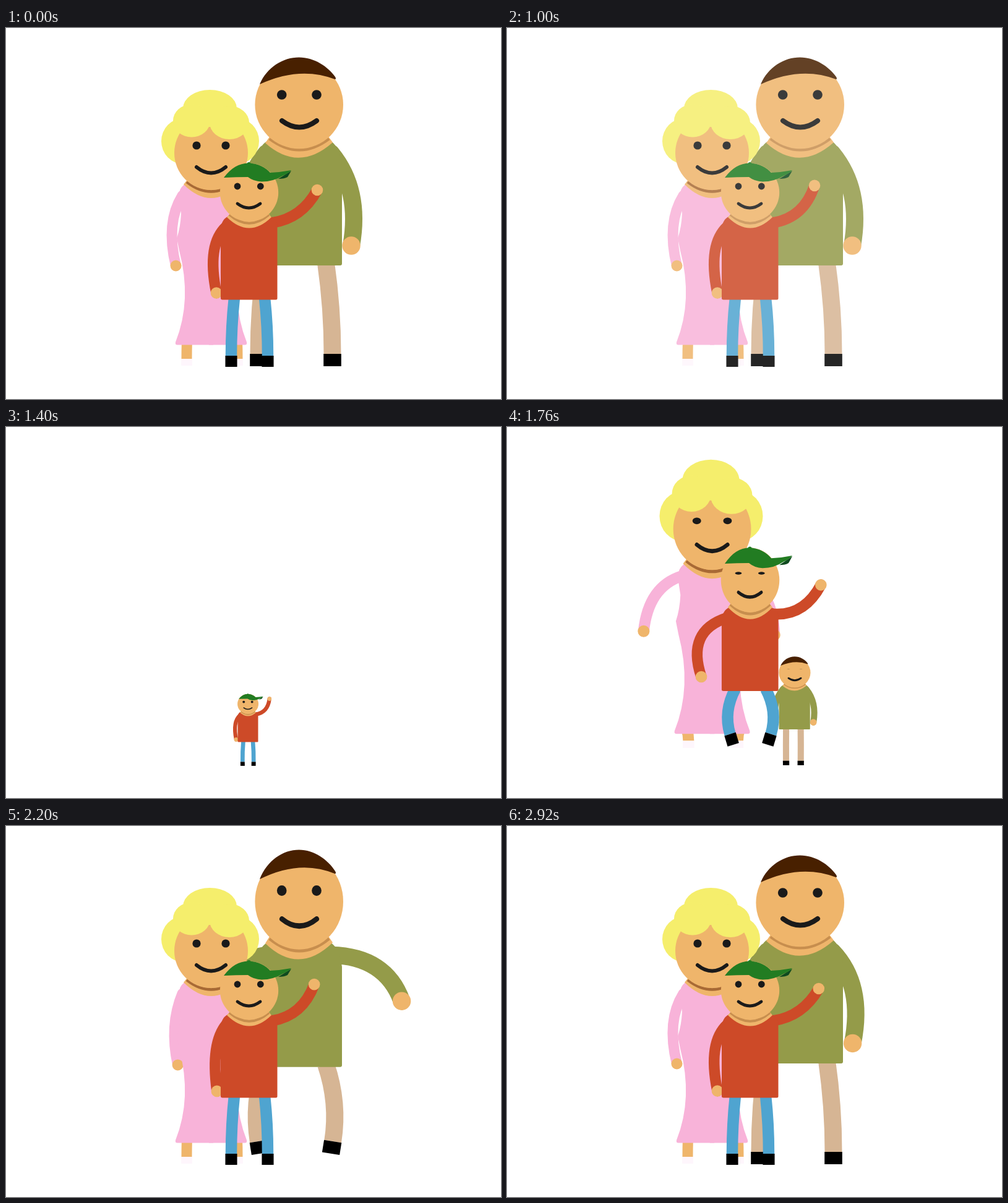
Recreate the animation shown at these times as an HTML page with a canvas. Size 800x600 px, loop 2960 ms.

```html
<!DOCTYPE html>
<html lang="en">
<head>
<meta charset="utf-8">
<title>Family</title>
<style>
  html, body { margin: 0; width: 100%; height: 100%; overflow: hidden; background: #fff; }
  canvas { display: block; width: 800px; height: 600px; }
</style>
</head>
<body>
<canvas id="stage" width="800" height="600"></canvas>
<script>
const canvas = document.getElementById('stage');
const ctx = canvas.getContext('2d');
const LOOP = 2960, STEP = 40, FADE_START = 965, FADE_END = 1200;
const SKIN = '#efb56b', INK = '#1a1a1a', SHADE = '#c78e4e';

// ---- drawing helpers ----
function fill(d, color) {
  ctx.fillStyle = color;
  ctx.fill(new Path2D(d));
}

function line(d, color, width, cap = 'butt') {
  ctx.strokeStyle = color;
  ctx.lineWidth = width;
  ctx.lineCap = cap;
  ctx.stroke(new Path2D(d));
}

function oval(x, y, rx, ry, color) {
  ctx.fillStyle = color;
  ctx.beginPath();
  ctx.ellipse(x, y, rx, ry, 0, 0, 7);
  ctx.fill();
}

// Draws the right side, then its reflection about x = cx
function mirrored(cx, draw) {
  draw(1);
  ctx.save();
  ctx.translate(2 * cx, 0);
  ctx.scale(-1, 1);
  draw(-1);
  ctx.restore();
}

// ---- motion ----
const clamp = x => Math.min(1, Math.max(0, x));
const ramp = (x, from, to) => {
  const k = clamp((x - from) / (to - from));
  return k * k * (3 - 2 * k);
};
const signedRoot = x => Math.sign(x) * Math.sqrt(Math.abs(x));

// Arms fly out until the landing, then swing back and settle
function swingAt(u) {
  const turn = .78, after = u - turn;
  return after < 0 ? ramp(u, .4, turn) : Math.exp(-5 * after) * Math.cos(2 * Math.PI * after);
}

// One entrance for all: u runs from 0 (nothing) past 1 (landed)
function poseAt(fig, t) {
  const u = t < FADE_END ? 9 : (t - fig.start) / fig.span;
  const crouch = ramp(u, .1, .45) - ramp(u, .75, 1.15);
  const wobble = Math.cos(2 * Math.PI * (Math.max(u, .44) - .44) / .57);
  const swing = swingAt(u);
  const bow = fig.leg.bow * crouch;
  return {
    size: 1.1 * ramp(u, 0, .4) - .1 * ramp(u, .53, .73),
    lift: fig.jump * Math.sin(Math.PI * clamp((u - .4) / .46)),
    drop: fig.crouch * crouch,
    head: 1 - .1 * wobble * (ramp(u, .05, .25) - ramp(u, 1, 1.1)),
    foot: .4 * bow - fig.leg.narrow * (1 - ramp(u, .1, .95)),
    hip: -.6 * fig.leg.narrow * (1 - ramp(u, .15, .45)),
    bow,
    eye: Math.min(...fig.blinks.map(b => ramp(Math.abs(t - b), 0, 120))),
    swing,
    elbow: signedRoot(swing)
  };
}

// ---- figures ----
const dad = {
  x: 460, base: 547, neck: 210, mid: 473,
  start: 1650, span: 720, jump: 28, crouch: 23, blinks: [1740, 1960],
  leg: { cx: 468, hip: 49, foot: 59.5, top: 380, end: 527, w: 28, shoe: 20, bow: 10, narrow: 27, color: '#d6b594', shoeColor: '#000' },
  arm: { s: [526, 203], c: [574, 262], h: [558, 352], cOut: [40, -57], hOut: [82, -75], w: 28, hand: 14.7, lead: 1, color: '#949b49' },
  face: { eyes: [445.7, 502], y: 108, r: 7.8, smile: 'M446 150Q474 171 502 150', w: 8 },
  torso() {
    fill('M422 183Q408 190 403 222V381Q403 384 406 384H540Q543 384 543 381V222Q539 192 525 183Z', '#949b49');
  },
  skull() {
    fill('M419 186L430 170H517L528 185Q473 234 419 186Z', SKIN);
    line('M426 179Q474 215 522 179', SHADE, 5);
    oval(473.7, 124, 71.3, 71.3, SKIN);
    fill('M410 91C422 63 448 47.5 473.5 47.5C498 47.5 520 62 532 79Q534 82 532 83Q475 61 410 91Z', '#482000');
  }
};

const mum = {
  x: 330, base: 546, neck: 275, mid: 331.5,
  start: 1400, span: 580, jump: 27, crouch: 12, blinks: [1840, 2510],
  leg: { cx: 333, hip: 40.5, foot: 41, top: 505, end: 535, w: 17, shoe: 11, bow: 0, narrow: 10, color: SKIN, shoeColor: '#fef6fc' },
  arm: { s: [378, 271], c: [405.4, 315], h: [388.5, 384.5], cOut: [30, -35], hOut: [77, -47], w: 17, hand: 9, lead: -1, color: '#f8b3d9' },
  face: { eyes: [308, 355], y: 190, r: 6.6, smile: 'M308 225Q331.5 244 355 225', w: 6 },
  torso() {
    mirrored(this.mid, () => fill('M335 250H291L284 257Q278 264 280 280L283 300Q282 322 276 340L280 360Q301 440 274 508Q273 512.5 277 512.5H335Z', '#f8b3d9'));
  },
  skull() {
    const hair = '#f5ee6c';
    oval(287, 183, 36, 37, hair);
    oval(373, 183, 36, 37, hair);
    fill('M287 253L297 240H366L376 253Q331.5 297 287 253Z', SKIN);
    line('M292 249Q331.5 280 371 249', '#a86a35', 4.5);
    oval(331.5, 202, 59.5, 60, SKIN);
    oval(329.5, 130, 43.5, 30, hair);
    oval(300, 150, 30, 26.5, hair);
    oval(361, 153, 32, 27, hair);
  }
};

const boy = {
  x: 390, base: 548, neck: 323.5, mid: 393,
  start: 1302, span: 640, jump: 40, crouch: 21, blinks: [1810],
  leg: { cx: 393.5, hip: 24.5, foot: 29.5, top: 436, end: 530, w: 18.5, shoe: 18, bow: 11, narrow: 5, color: '#4fa4d0', shoeColor: '#000' },
  arm: { s: [430, 321], c: [462, 350], h: [446, 428.5], cOut: [36, -8], hOut: [28, -13], w: 17.5, hand: 9.3, lead: -1, waves: true, color: '#cd4a28' },
  face: { eyes: [374, 411.3], y: 256, r: 5.4, smile: 'M374 284Q392.5 298 411 284', w: 4.8 },
  torso() {
    fill('M358 305Q347 311 347 328V437Q347 439.5 350 439.5H436Q438.5 439.5 438.5 437V320Q438 308 428 305Z', '#cd4a28');
  },
  skull() {
    fill('M357 306L366 295H420L429 306Q393 341 357 306Z', SKIN);
    line('M361 302Q393 329.5 425 302', SHADE, 4);
    oval(393, 266, 47.2, 47.2, SKIN);
    fill('M440 244Q450 244 455 241L461 231Z', '#0e4a1f');
    oval(392.5, 219.5, 3, 2.5, '#227c22');
    fill('M352 242C364 226 376 219 392 218.5C408 219 420 226 427 234Q445 233 461 230Q455 236 447 239Q432 248.5 413 248.5Q400 248 391 241Q372 241 352 242Z', '#227c22');
  }
};

function drawLegs(g, p) {
  mirrored(g.cx, () => {
    const hip = g.cx + g.hip + p.hip, foot = g.cx + g.foot + p.foot;
    const top = g.top + p.drop, knee = (top + g.end) / 2;
    line(`M${hip} ${top}Q${foot + p.bow} ${knee} ${foot} ${g.end}`, g.color, g.w);
    ctx.save();
    ctx.translate(foot, g.end);
    ctx.rotate(Math.atan2(p.bow, g.end - knee));
    ctx.fillStyle = g.shoeColor;
    ctx.fillRect(-g.w / 2 - .3, 0, g.w + .6, g.shoe);
    ctx.restore();
  });
}

function drawArm(a, shoulder, elbow, hand) {
  line(`M${shoulder}Q${elbow} ${hand}`, a.color, a.w, 'round');
  oval(...hand, a.hand, a.hand, SKIN);
}

function drawArms(fig, p, t) {
  const a = fig.arm;
  const push = (from, out, k) => [from[0] + out[0] * k, from[1] + out[1] * k];
  mirrored(fig.mid, side => {
    if (a.waves && side > 0) {
      // five waves per loop; the arm sags a little during the jump
      const w = (1 - Math.cos((t + 45) / LOOP * 10 * Math.PI)) / 2;
      const elbow = push([478 + 4 * w, 308 - 2 * w], [2, 12], p.swing);
      const hand = push([503.8 - 15 * w, 263 - 18 * w], [4, 6], p.swing);
      drawArm(a, [430, 315], elbow, hand);
      return;
    }
    const k = side === a.lead ? 1 : .8;
    drawArm(a, a.s, push(a.c, a.cOut, p.elbow * k), push(a.h, a.hOut, p.swing * k));
  });
}

function drawFace(f, eye) {
  for (const x of f.eyes) oval(x, f.y, f.r, f.r * eye, INK);
  line(f.smile, INK, f.w, 'round');
}

function drawFigure(fig, t) {
  const p = poseAt(fig, t);
  if (p.size <= 0) return;
  ctx.save();
  ctx.translate(fig.x, fig.base - p.lift);
  ctx.scale(p.size, p.size);
  ctx.translate(-fig.x, -fig.base);
  drawLegs(fig.leg, p);
  ctx.translate(0, p.drop);
  drawArms(fig, p, t);
  fig.torso();
  ctx.translate(0, fig.neck);
  ctx.scale(1, p.head);
  ctx.translate(0, -fig.neck);
  fig.skull();
  drawFace(fig.face, p.eye);
  ctx.restore();
}

function render(now) {
  const t = Math.floor(now % LOOP / STEP) * STEP;
  canvas.style.opacity = t < FADE_END ? 1 - clamp((t - FADE_START) / (FADE_END - FADE_START)) : 1;
  ctx.clearRect(0, 0, 800, 600);
  for (const fig of [dad, mum, boy]) drawFigure(fig, t);
}

const start = performance.now();
function tick() {
  render(performance.now() - start);
  requestAnimationFrame(tick);
}
tick();
</script>
</body>
</html>
```
